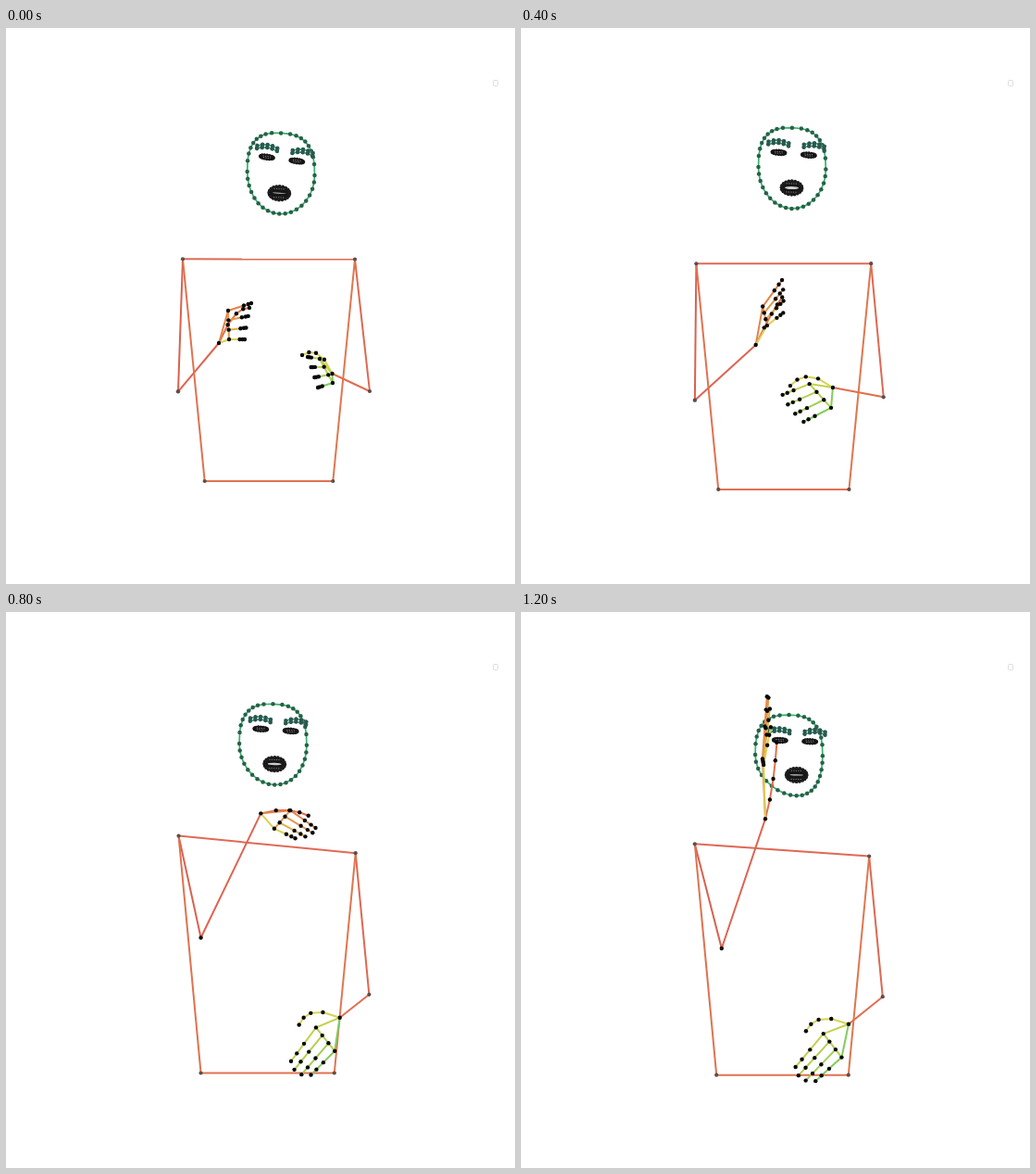
An HTML page that plays this animation: 550 by 600 pixels, repeating every 1.28 s.

```html
<!DOCTYPE html>
<html lang="en">
<head>
<meta charset="utf-8">
<title>Signing figure</title>
<style>
html, body { margin: 0; width: 100%; height: 100%; overflow: hidden; background: #fff; }
svg { display: block; width: 100vw; height: 100vh; }
</style>
</head>
<body>
<svg id="stage" viewBox="0 0 550 600"></svg>
<script>
const LOOP = 1280, STEP = 80;
const stage = document.getElementById('stage');

// Hand shapes relative to the wrist. Points: thumb bend and tip,
// index base and tip, little finger base and tip.
// reach: length of the middle fingers, knuckle: place of the first joint
const REACH = { reach: .97, knuckle: .68, points: [[16,-39], [33,-38], [10,-35], [35,-43], [11,-4], [28,-4]] };
const RAISED = { reach: 1.08, knuckle: .52, points: [[10,-25], [15,-65], [-1,-51], [6,-104], [0,-46], [9,-78]] };
const PALM = { reach: 1.08, knuckle: .5, points: [[-7,-29], [1,-68], [-6,-52], [2,-104], [7,-47], [13,-88]] };
const DROOP = { reach: 1.08, knuckle: .6, points: [[28,7], [37.5,26], [22.5,11], [29,36], [-.7,13], [7,30]] };
const CURLED = { reach: 1, knuckle: .7, points: [[-13.5,-32], [-32.5,-20], [-13.5,-16], [-26.5,-18], [.5,10], [-15.5,15]] };
const OPEN = { reach: 1.08, knuckle: .48, points: [[-37,-16], [-49,8], [-29,11], [-61,49], [-8,38], [-38,65]] };

// Places a scaled and skewed hand; its points are kept as angle and distance,
// so that a hand turns about the wrist between two poses
function hand(side, shape, x, y, sx = 1, sy = 1, kx = 0, ky = 0) {
  const polar = shape.points.flatMap(([px, py]) => {
    const dx = sx * px + kx * py, dy = sy * py + ky * px;
    return [Math.atan2(dy, side * dx), Math.hypot(dx, dy)];
  });
  return [x, y, shape.reach, shape.knuckle, ...polar];
}
const left = (...args) => hand(1, ...args);
const right = (...args) => hand(-1, ...args);

// arms: shoulders, elbows; hips: centre, half width
// face: centre, turn, tilt, mouth opening
const keys = [
  { time: 0, arms: [191,249.3, 377,249.6, 186,392.3, 393,392], hips: [284,489, 69.3],
    left: left(REACH, 230, 340), right: right(CURLED, 352.5, 373),
    face: [297.1, 157, -1.8, .134, .5] },
  { time: 320, arms: [191.3,253, 378.3,251.2, 189,398.3, 390.3,393.5], hips: [284.9,492.5, 69.8],
    left: left(REACH, 242.5, 350, 1.05, 1.1, 0, -.25), right: right(CURLED, 332, 372.7, 1.25, 1, 0, -.3),
    face: [294.8, 156, -.2, .094, .8] },
  { time: 480, arms: [187,255.2, 378,258, 186.7,404, 393.2,405.3], hips: [282.5,502.7, 71.5],
    left: left(RAISED, 262.5, 323.3, 1, .82, -.075), right: right(OPEN, 345.5, 411.3, 1, .87),
    face: [290.9, 146.4, -.7, .083, 2.2] },
  { time: 640, arms: [185.8,246.5, 376.5,261.8, 206.8,361.3, 393,414], hips: [281.7,499.7, 72],
    left: left(PALM, 256.3, 215), right: right(OPEN, 360.7, 438.5, .64, .84, .05),
    face: [289.1, 145.5, 1.2, .09, 1.7] },
  { time: 880, arms: [186.8,240, 378.3,258.7, 211.8,350, 392.2,411.8], hips: [283,496.7, 72.2],
    left: left(DROOP, 282, 218.2), right: right(OPEN, 360.7, 437.5, 1, .99, .03),
    face: [288.4, 141.4, 2.1, .055, 1] },
  { time: 1040, arms: [184.8,238.2, 378.7,253, 213.8,354, 393.7,408.8], hips: [282.3,495.7, 73.3],
    left: left(RAISED, 268.3, 212), right: right(OPEN, 358, 438),
    face: [289, 139, 6.7, .045, .6] },
  { time: 1200, arms: [187.8,250.3, 376.2,263.5, 216.8,363, 390.8,415.2], hips: [282.5,499.7, 71.3],
    left: left(RAISED, 264, 223.3, 1, 1.27, .04), right: right(OPEN, 354, 444.7, .94, .945),
    face: [289.5, 154.7, 8.2, .04, .7] }
];

const LEFT_COLORS = ['#e0704c', '#e3834a', '#e0994a', '#deb04c', '#dbcf55'];
const RIGHT_COLORS = ['#d5d355', '#c4d04e', '#b4cf50', '#a2cf54', '#7fcc5c'];

// Smooth curve through the keys without overshoot
function valueAt(part, k, i, time) {
  const value = j => keys[j][part][i];
  const slope = j => (value(j + 1) - value(j)) / (keys[j + 1].time - keys[j].time);
  const tangent = j => {
    if (j === 0) return slope(0);
    if (j === keys.length - 1) return slope(j - 1);
    const a = slope(j - 1), b = slope(j);
    return a * b > 0 ? 2 * a * b / (a + b) : 0;
  };
  const span = keys[k + 1].time - keys[k].time;
  const u = (time - keys[k].time) / span, w = 1 - u;
  return value(k) * w * w * (1 + 2 * u) + value(k + 1) * u * u * (3 - 2 * u)
    + span * u * w * (w * tangent(k) - u * tangent(k + 1));
}

function sample(part, time) {
  let k = 0;
  while (k < keys.length - 2 && time >= keys[k + 1].time) k++;
  return keys[0][part].map((_, i) => valueAt(part, k, i, time));
}

const range = (n, fn) => Array.from({ length: n }, (_, i) => fn(i));
const mix = (a, b, t) => [a[0] + (b[0] - a[0]) * t, a[1] + (b[1] - a[1]) * t];
const line = (pts, color, width = 2, close = false) =>
  `<path d="M${pts.map(p => p.map(v => v.toFixed(2)).join(' ')).join('L')}${close ? 'Z' : ''}" fill="none" stroke="${color}" stroke-width="${width}" stroke-linejoin="round"/>`;
const dots = (pts, color, r) =>
  pts.map(([x, y]) => `<circle cx="${x.toFixed(2)}" cy="${y.toFixed(2)}" r="${r}" fill="${color}"/>`).join('');
const ellipse = (rx, ry, fill) => `<ellipse rx="${rx}" ry="${ry}" fill="${fill}"/>`;
const hatch = (y, half) =>
  `<path d="M${-half} ${y}h${2 * half}" stroke="#999" stroke-width=".8" stroke-dasharray="1.2 1.3"/>`;
const ring = (rx, ry, n) => range(n, i => {
  const a = i / n * 2 * Math.PI;
  return [rx * Math.cos(a), ry * Math.sin(a)];
});
const place = (x, y, tilt, content) =>
  `<g transform="translate(${x} ${y}) rotate(${Math.atan(tilt) * 180 / Math.PI})">${content}</g>`;

function drawBody(arms, [hx, hy, half], leftWrist, rightWrist, time) {
  const [ls, rs, le, re] = range(4, i => arms.slice(2 * i, 2 * i + 2));
  const lh = [hx - half, hy], rh = [hx + half, hy];
  return line([ls, rs], '#df6a55') + line([ls, le], '#d9614f') + line([le, leftWrist], '#df6350')
    + line([rs, re], '#de6851') + line([re, rightWrist], '#e06d4f')
    + line([ls, lh], '#df724f') + line([rs, rh], '#df764f') + line([lh, rh], '#e07250')
    + dots([ls, rs, re, lh, rh], '#5c4f49', 2.1) + dots([le], time < 560 ? '#5c4f49' : '#111', 2.2);
}

function drawHand(side, [x, y, reach, knuckle, ...polar], colors) {
  const wrist = [x, y];
  const [bend, tip, indexBase, indexTip, littleBase, littleTip] = range(6, i => {
    const angle = polar[2 * i], r = polar[2 * i + 1];
    return [x + side * r * Math.cos(angle), y + r * Math.sin(angle)];
  });
  const thumb = [.3, .58, .8, 1].map(t => mix(mix(wrist, bend, t), mix(bend, tip, t), t));
  const fingers = range(4, i => {
    const base = mix(indexBase, littleBase, i / 3);
    const end = mix(wrist, mix(indexTip, littleTip, i / 3), i % 3 ? reach : 1);
    return [0, knuckle, (1 + knuckle) / 2 + .03, 1].map(t => mix(base, end, t));
  });
  const chains = [[wrist, ...thumb], [wrist, ...fingers[0]], fingers[1], fingers[2], [wrist, ...fingers[3]]];
  return line(fingers.map(f => f[0]), colors[2])
    + chains.map((chain, i) => line(chain, colors[i])).join('')
    + dots([wrist, ...thumb, ...fingers.flat()], '#080808', 2.2);
}

// Squarish forehead, round jaw; the chin follows the turn of the head
function faceOutline(cx, cy, turn, tilt) {
  return ring(1, 1, 36).map(([c, s]) => {
    const power = s < 0 ? .74 : 1;
    const dx = 36.4 * Math.sign(c) * Math.abs(c) ** power;
    const dy = 43.6 * Math.sign(s) * Math.abs(s) ** power;
    return [cx + dx + (s > 0 ? turn * s * s : 0), cy + dy + dx * tilt * .4];
  });
}

function drawBrow(side) {
  return [-13.2, -10.2].map(height => {
    const pts = range(5, i => [side * (5.5 * i - 8) + 2, height + .6 * (i - 2) ** 2]);
    return line(pts, '#39a482', 1.6) + dots(pts, '#2b584e', 2.3);
  }).join('');
}

function drawFace([cx, cy, turn, tilt, gap]) {
  const outline = faceOutline(cx, cy, turn, tilt);
  const eyeX = cx + 2 + .55 * turn, eyeY = cy - 15.6;
  const eye = ellipse(7.5, 2.6, '#111') + dots(ring(7.2, 2, 16), '#151515', 1.8)
    + hatch(-.8, 4.5) + hatch(.9, 4);
  const mouth = ellipse(11.5, 7.5, '#161616') + dots(ring(11, 7.2, 20), '#1b1b1b', 2)
    + hatch(-4.6, 6) + hatch(4.6, 6) + ellipse(7.5, gap, '#ccc');
  return line(outline, '#35b36b', 1.7, true) + dots(outline, '#29604a', 2.25)
    + [-1, 1].map(side =>
      place(eyeX + side * 16.2, eyeY + side * 16.2 * tilt, tilt, drawBrow(side) + eye)).join('')
    + place(cx + turn, cy + 21.2, tilt * .4, mouth);
}

function draw(time) {
  const leftHand = sample('left', time), rightHand = sample('right', time);
  stage.innerHTML = '<rect width="550" height="600" fill="#fff"/>'
    + '<rect x="526.5" y="56.5" width="5" height="6" rx="1" fill="#fff" stroke="#ddd"/>'
    + drawBody(sample('arms', time), sample('hips', time), leftHand.slice(0, 2), rightHand.slice(0, 2), time)
    + drawFace(sample('face', time))
    + drawHand(1, leftHand, LEFT_COLORS) + drawHand(-1, rightHand, RIGHT_COLORS);
}

const start = performance.now();
let shown = -1;
function tick() {
  const time = Math.floor((performance.now() - start) % LOOP / STEP) * STEP;
  if (time !== shown) draw(shown = time);
  requestAnimationFrame(tick);
}
tick();
</script>
</body>
</html>
```
